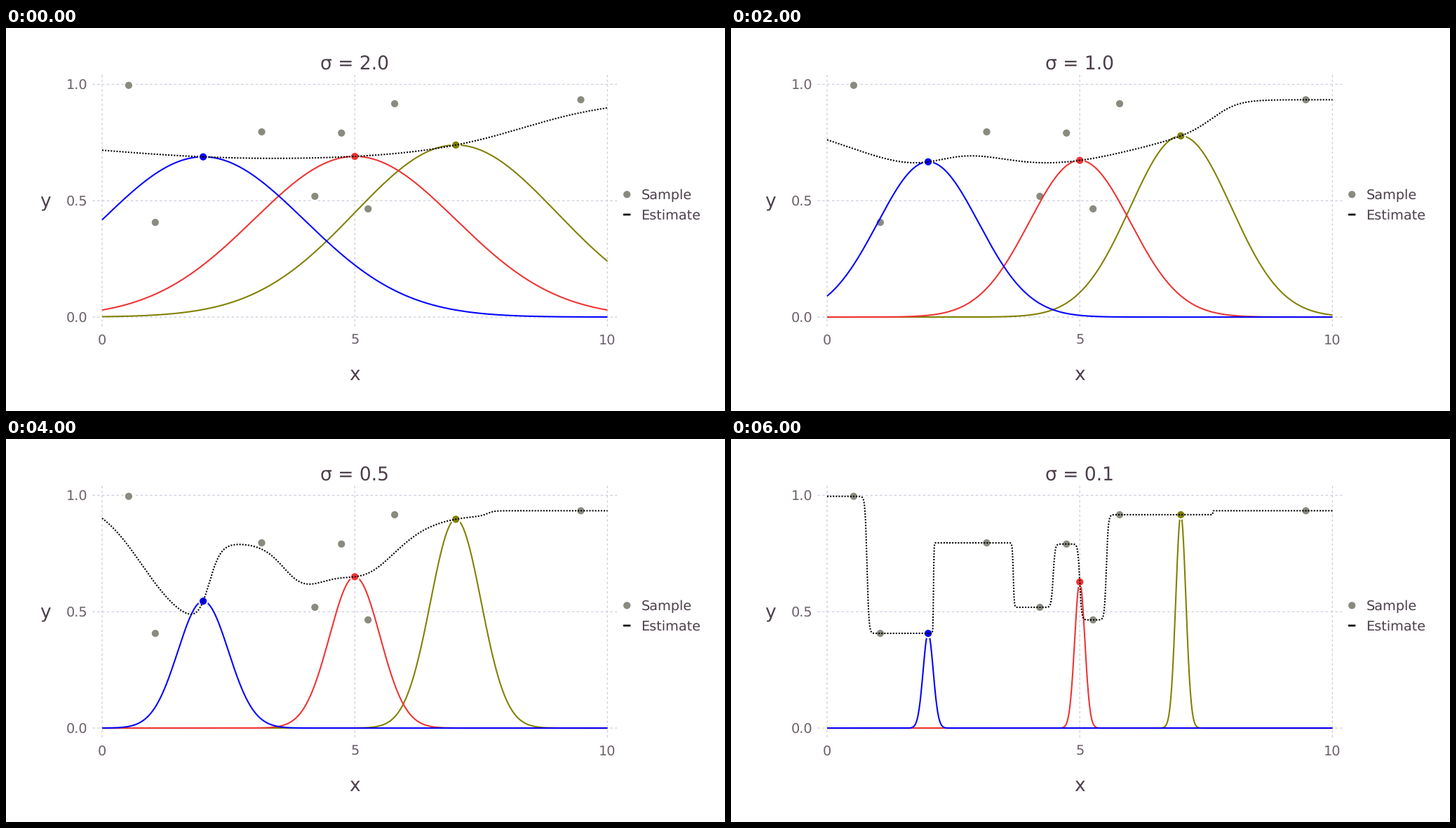
Write a matplotlib script that moves like this. It is 1025 px wide and 546 px high and loops after 7 s.

```python
import numpy as np
import matplotlib.pyplot as plt
from matplotlib.animation import FuncAnimation
from matplotlib.patches import Circle

WIDTH, HEIGHT, DPI = 1025, 546, 100
PX = 72 / DPI  # points per pixel
MM = WIDTH / 150  # pixels per millimetre of a 150 mm wide plot
SMALL, LARGE = 8 * MM * 25.4 / 72, 11 * MM * 25.4 / 72
SIGMAS = [2.0, 1.5, 1.0, 0.75, 0.5, 0.25, 0.1]
CENTERS = [(7, "#808000"), (5, "#f03232"), (2, "#0000ff")]
SAMPLE_X = np.array([1, 2, 6, 8, 9, 10, 11, 18]) * 10 / 19
SAMPLE_Y = np.array([0.996, 0.407, 0.796, 0.519, 0.791, 0.465, 0.917, 0.934])
GRAY, GRID = "#8a8a7f", "#d0d0e0"
LABEL, TICK = "#4c404b", "#6c606b"

plt.rcParams["font.family"] = "DejaVu Sans"
plt.rcParams["lines.scale_dashes"] = False
plt.rcParams["text.hinting"] = "no_hinting"


def to_x(x):
    return 137 + 72.04 * np.asarray(x)


def to_y(y):
    return 412.1 - 331.7 * np.asarray(y)


def kernel(distance, sigma):
    return np.exp(-distance**2 / (2 * sigma**2))


def estimate(x, sigma):
    weights = kernel(np.atleast_1d(x)[:, None] - SAMPLE_X, sigma)
    return weights @ SAMPLE_Y / weights.sum(axis=1)


fig = plt.figure(figsize=(WIDTH / DPI, HEIGHT / DPI), dpi=DPI, facecolor="white")
ax = fig.add_axes([0, 0, 1, 1])
ax.set(xlim=(0, WIDTH), ylim=(HEIGHT, 0))
ax.axis("off")


def line(x, y, color, width, z, **style):
    return ax.plot(x, y, color=color, lw=width * PX, zorder=z, snap=False,
                   solid_capstyle="butt", dash_capstyle="butt", **style)[0]


def dot(x, y, color, z):
    return ax.add_patch(Circle((x, y), 0.9 * MM, fc=color, ec="white",
                               lw=0.3 * MM * PX, zorder=z, snap=False))


def label(x, y, text, size, color, ha="center"):
    return ax.text(x, y, text, fontsize=size * PX, color=color,
                   ha=ha, va="baseline")


def dashes(length):
    return (0, (length * PX, length * PX))


pad = 2 * MM
left, right = to_x(0) - pad, to_x(10) + pad
top, bottom = to_y(1) - pad, to_y(0) + pad
for value in (0, 5, 10):
    gx = to_x(value)
    line([gx, gx], [top, bottom], GRID, 0.2 * MM, 1, ls=dashes(0.5 * MM))
    label(gx, 450.5, str(value), SMALL, TICK)
for value in (0.0, 0.5, 1.0):
    gy = to_y(value)
    line([left, right], [gy, gy], GRID, 0.2 * MM, 1, ls=dashes(0.5 * MM))
    label(116.5, gy + 6.7, str(value), SMALL, TICK, "right")

title = label(497.2, 59, "", LARGE, LABEL)
label(497.2, 501.5, "x", LARGE, LABEL)
label(56.2, 255.5, "y", LARGE, LABEL)

dot(885.2, 237.3, GRAY, 2)
line([880, 890.3], [266, 266], "black", 2.7, 2)
label(905.4, 244, "Sample", SMALL, LABEL, "left")
label(905.2, 272.7, "Estimate", SMALL, LABEL, "left")

for x, y in zip(to_x(SAMPLE_X), to_y(SAMPLE_Y)):
    dot(x, y, GRAY, 2)
xs = np.linspace(0, 10, 1001)
bells = [line(to_x(xs), xs, color, 0.3 * MM, 3) for _, color in CENTERS]
peaks = [dot(to_x(c), 0, color, 4) for c, color in CENTERS]
fit = line(to_x(xs), xs, "black", 0.3 * MM, 5, ls=dashes(0.3 * MM))


def draw(frame):
    sigma = SIGMAS[frame]
    title.set_text(f"σ = {sigma}")
    fit.set_ydata(to_y(estimate(xs, sigma)))
    for (center, _), bell, peak in zip(CENTERS, bells, peaks):
        height = estimate(center, sigma)[0]
        bell.set_ydata(to_y(height * kernel(xs - center, sigma)))
        peak.center = to_x(center), to_y(height)
    return [title, fit, *bells, *peaks]


animation = FuncAnimation(fig, draw, frames=len(SIGMAS), interval=1000,
                          repeat=True, repeat_delay=0)
plt.show()
```
